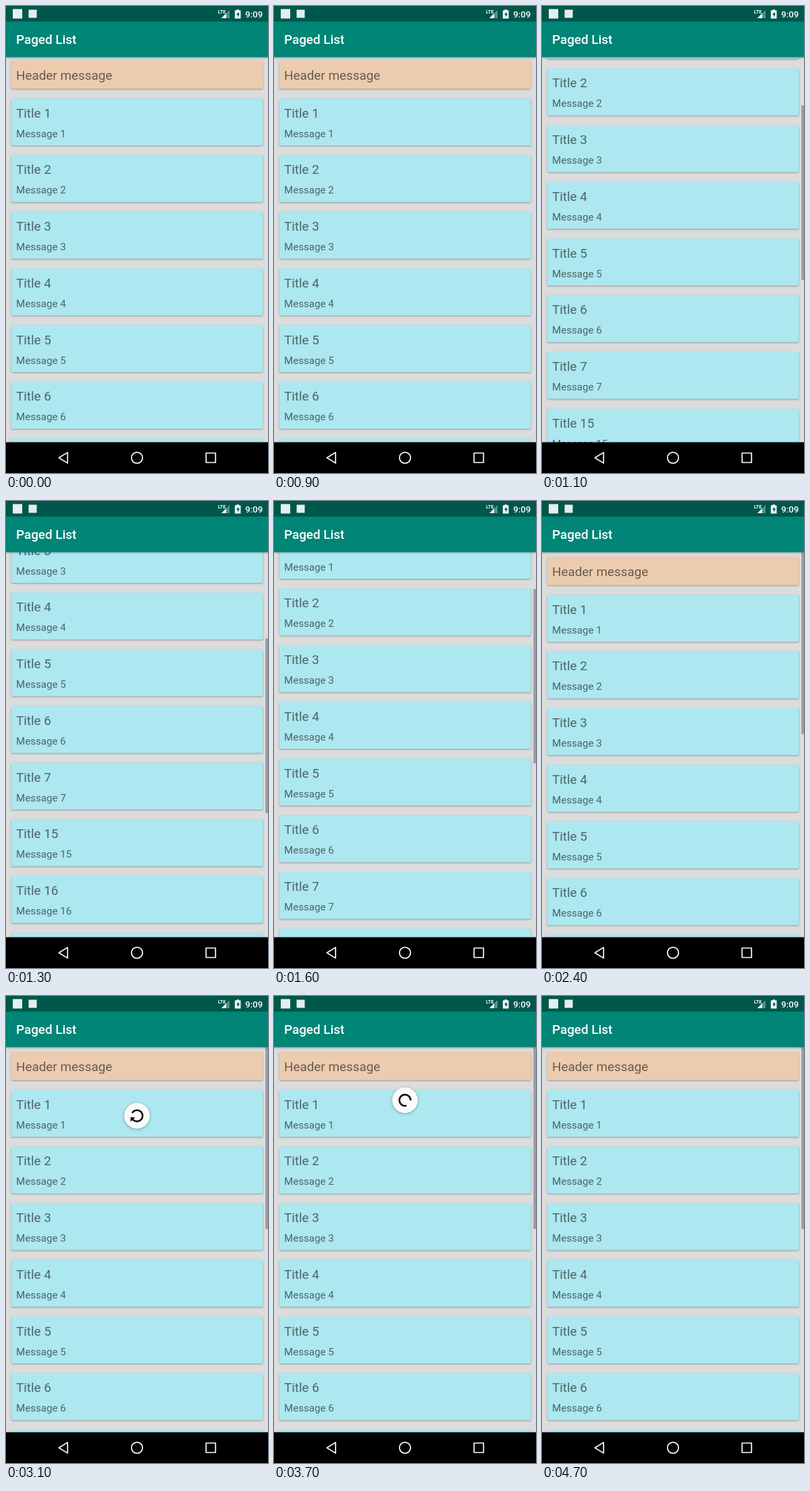
These frames come from a looping animation (388x690 px, 4900 ms). An HTML page:

```html
<!DOCTYPE html>
<html lang="en">
<head>
<meta charset="utf-8">
<title>Paged List</title>
<style>
  html, body { margin: 0; height: 100%; overflow: hidden; background: #dcdcdc; }
  svg { display: block; font-family: Roboto, sans-serif; }
  .card { fill: #ade7ef; filter: drop-shadow(0 1px 1px rgba(0,0,0,.32)); }
  .head { fill: #ecccae; }
  .title { font-size: 18.87px; }
  .message { font-size: 15.1px; }
  #list text { fill: rgba(0,0,0,.56); }
  #bar { filter: drop-shadow(0 1.5px 1.5px rgba(0,0,0,.35)); }
  #disc { filter: drop-shadow(0 1px 2px rgba(0,0,0,.3)); }
</style>
</head>
<body>
<svg width="388" height="690" viewBox="0 0 388 690">
  <rect width="388" height="690" fill="#dcdcdc"/>
  <g id="list"></g>
  <rect id="thumb" x="384.2" width="3.8" fill="#000" fill-opacity=".29"/>

  <g id="spinner">
    <circle id="disc" r="18.9" fill="#fafafa"/>
    <g id="ring">
      <path id="arc" fill="none" stroke="#000" stroke-width="2.4"/>
      <path id="arrow" d="M-4.7 0H4.7L0 4.8Z"/>
    </g>
  </g>

  <rect id="bar" width="388" height="75.5" fill="#008577"/>
  <rect width="388" height="23" fill="#00574b"/>
  <text class="title" x="15" y="56.3" fill="#fff" font-weight="500">Paged List</text>

  <g fill="#fff">
    <rect x="10" y="4.5" width="14" height="14" opacity=".9"/>
    <rect x="33.5" y="5.5" width="12" height="12" opacity=".9"/>
    <text x="314" y="10.5" font-size="7" font-weight="700">LTE</text>
    <path d="M331 6V18H319Z" opacity=".35"/>
    <path d="M326 11V18H319Z"/>
    <path d="M341.5 5.2h3.4v1.2h2.6v12h-8.6v-12h2.6z"/>
    <path d="M344.2 8.2l-3.2 4.8h2v3.6l3.2-5h-2z" fill="#00574b"/>
    <text x="354.3" y="16.8" font-size="13.2" font-weight="500">9:09</text>
  </g>

  <rect y="644.5" width="388" height="45.5"/>
  <g fill="none" stroke="#fff" stroke-width="1.7" stroke-linejoin="round">
    <path d="M78.3 667.5L91.2 659.6V675.4Z"/>
    <circle cx="194" cy="667.5" r="8.2"/>
    <rect x="296.3" y="660.5" width="14" height="14"/>
  </g>
</svg>
<script>
const $ = id => document.getElementById(id);
const LOOP = 4900, STEP = 100;
const TOP = 75.5, VIEW = 569, PITCH = 83.75, HEAD = 56.3;

// Key points: [time, value]
const SCROLL = [[900, 2], [1000, 40], [1100, 130], [1200, 215], [1300, 254.5], [1400, 225],
  [1500, 155], [1600, 93], [1700, 52], [1800, 27], [1900, 12], [2100, 4], [2300, 0]];
const PULL = [[2700, 54], [2800, 78], [2900, 118], [3000, 158], [3100, 177], [3200, 177], [3400, 154]];

function at(keys, t) {
  if (t <= keys[0][0]) return keys[0][1];
  for (let i = 1; i < keys.length; i++) {
    const [t0, a] = keys[i - 1], [t1, b] = keys[i];
    if (t <= t1) return a + (b - a) * (t - t0) / (t1 - t0);
  }
  return keys[keys.length - 1][1];
}
const clamp = x => Math.max(0, Math.min(1, x));

function card(y, h, title, message) {
  return `<rect class="card ${message ? '' : 'head'}" x="7.7" y="${y}" width="372.8" height="${h}" rx="1.9"/>
    <text class="title" x="15" y="${y + 28}">${title}</text>
    <text class="message" x="15" y="${y + 57}">${message}</text>`;
}

// The second page starts at 15
const ids = [...Array(14).keys()].map(i => i < 7 ? i + 1 : i + 8);
$('list').innerHTML = card(82.5, 41.7, 'Header message', '') +
  ids.map((n, i) => card(138.6 + PITCH * i, 69.3, 'Title ' + n, 'Message ' + n)).join('');

// Thumb size follows the mean height of the rows in view
function drawThumb(t, scroll) {
  const past = scroll > HEAD;
  const range = 15 * (past ? PITCH : (HEAD + 7 * PITCH) / 8);
  const offset = past ? scroll + PITCH - HEAD : scroll;
  $('thumb').setAttribute('y', TOP + offset * VIEW / range);
  $('thumb').setAttribute('height', VIEW * VIEW / range);
  $('thumb').style.opacity = t >= 1000 ? 1 : 0;
}

function drawSpinner(t) {
  const y = at(PULL, t), size = 1 - clamp((t - 3700) / 200);
  const visible = t >= 2800 && size > 0;
  $('spinner').style.display = visible ? '' : 'none';
  if (!visible) return;
  const pull = t < 3200 ? clamp((y - 56) / 110) : 1;
  const spin = Math.max(0, t - 3200) * .45;
  const r = 8.3, sweep = 288 * pull, end = sweep * Math.PI / 180;
  $('spinner').setAttribute('transform', `translate(194 ${y}) scale(${size})`);
  $('ring').setAttribute('transform', `rotate(${210 - 140 * (1 - pull) + spin})`);
  $('ring').style.opacity = .3 + .7 * pull;
  $('arc').setAttribute('d',
    `M${r} 0A${r} ${r} 0 ${sweep > 180 ? 1 : 0} 1 ${r * Math.cos(end)} ${r * Math.sin(end)}`);
  $('arrow').setAttribute('transform', `rotate(${sweep}) translate(${r} 0) scale(${pull})`);
  $('arrow').style.display = t < 3400 ? '' : 'none';
}

function draw(now) {
  const t = Math.floor(now % LOOP / STEP) * STEP;
  const scroll = at(SCROLL, t);
  $('list').setAttribute('transform', `translate(0 ${-scroll})`);
  drawThumb(t, scroll);
  drawSpinner(t);
}

let start;
function tick(now) {
  start ??= now;
  draw(now - start);
  requestAnimationFrame(tick);
}
draw(0);
requestAnimationFrame(tick);
</script>
</body>
</html>
```
